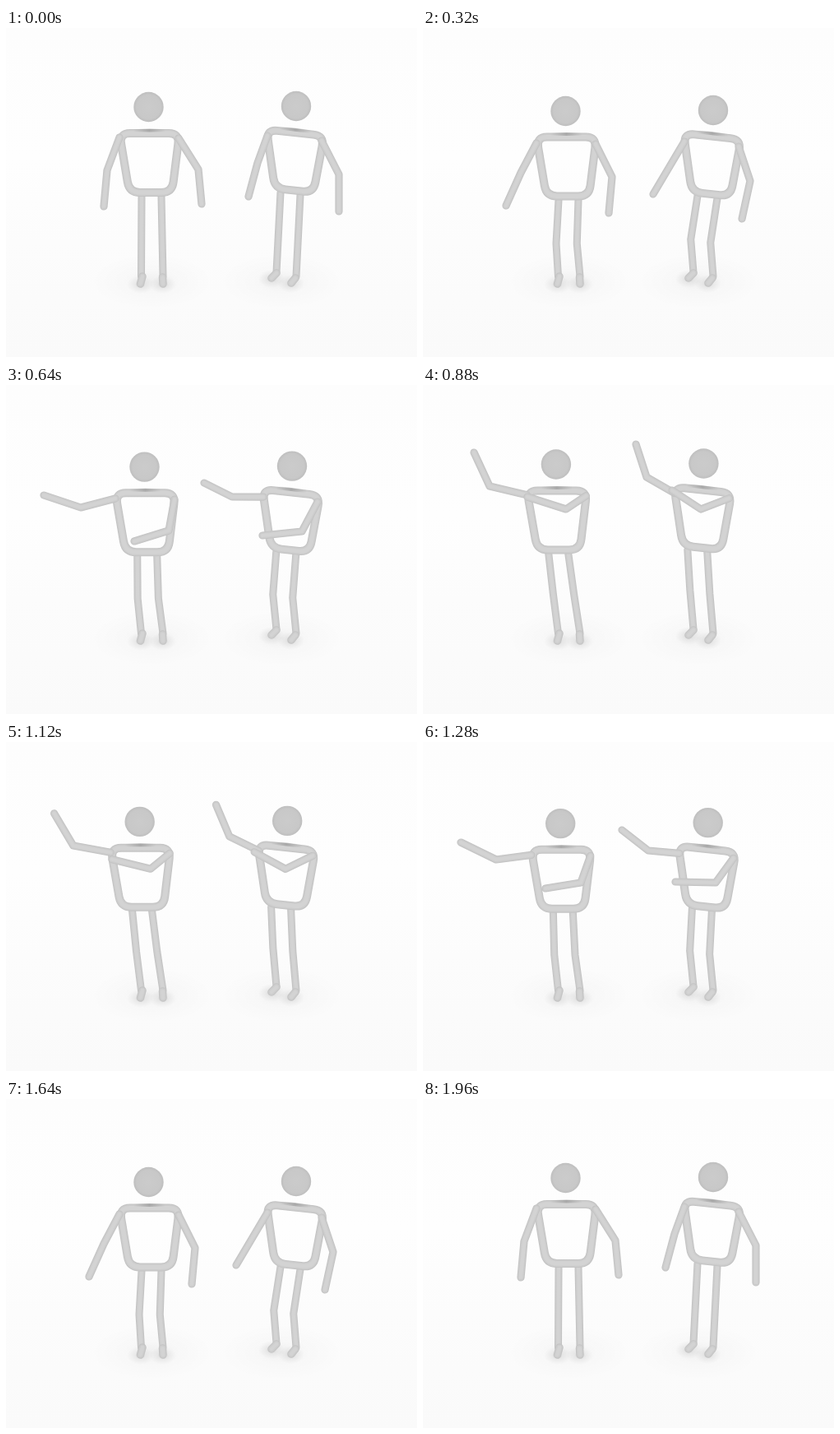
Animation, 500 px wide and 400 px high, one loop 2480 ms. Source, as an HTML page:

```html
<!DOCTYPE html>
<html lang="en">
<head>
<meta charset="utf-8">
<title>Two figures</title>
<style>
  html, body { margin: 0; width: 100%; height: 100%; overflow: hidden; background: #fdfdfd; }
  svg { display: block; width: 100%; height: 100%; }
  path { fill: none; stroke-linecap: round; stroke-linejoin: round; }
</style>
</head>
<body>
<svg id="stage" viewBox="0 0 500 400">
  <defs>
    <linearGradient id="room" x2="0" y2="1">
      <stop offset="0" stop-color="#fdfdfd"/>
      <stop offset=".4" stop-color="#fefefe"/>
      <stop offset=".65" stop-color="#fcfcfc"/>
      <stop offset="1" stop-color="#fafafa"/>
    </linearGradient>
    <radialGradient id="shade">
      <stop offset="0" stop-color="#000" stop-opacity=".16"/>
      <stop offset=".4" stop-color="#000" stop-opacity=".05"/>
      <stop offset="1" stop-color="#000" stop-opacity="0"/>
    </radialGradient>
    <radialGradient id="ball">
      <stop offset="0" stop-color="#cbcbcb"/>
      <stop offset=".8" stop-color="#c8c8c8"/>
      <stop offset="1" stop-color="#bebebe"/>
    </radialGradient>
    <linearGradient id="neck">
      <stop offset=".2" stop-color="#8c8c8c" stop-opacity="0"/>
      <stop offset=".5" stop-color="#8c8c8c" stop-opacity=".55"/>
      <stop offset=".8" stop-color="#8c8c8c" stop-opacity="0"/>
    </linearGradient>
  </defs>
  <rect width="500" height="400" fill="url(#room)"/>
</svg>
<script>
const STEP = 40, STEPS = 62, APEX = 24;
const KEYS = [0, 8, 16, 17, 22, APEX];
const SWAY = [0, 0, -5, -6.3, -11.6];
const DROP = [0, 5, 3.6, 3.1, 0.5];

// Arm poses are [elbow x, elbow y, hand x, hand y] at each key.
const FIGURES = [
  {
    head: [173.5, 96],
    torso: [[138, 128], [211, 128], [202, 200], [150, 200]],
    legs: [
      { hip: [165, 205], ankle: [164.5, 302], foot: [[166, 302], [163.5, 311]] },
      { hip: [189, 205], ankle: [191, 302], foot: [[190.5, 303], [191, 311]] }
    ],
    bend: 0.55,
    arms: [
      { shoulder: [138, 133], poses: [[123, 173, 119, 217], [119, 176, 101, 216],
        [91, 149, 46, 134], [89, 143, 46, 122], [81, 123, 62, 82]] },
      { shoulder: [210, 134], poses: [[234, 172, 238, 214], [230, 181, 226, 225],
        [198, 177, 156, 190], [192, 171, 149, 178], [174, 151, 127, 136]] }
    ]
  },
  {
    head: [353, 95],
    torso: [[317, 123.5], [387, 131], [374, 200], [327, 195]],
    legs: [
      { hip: [334, 200], ankle: [329, 297], foot: [[329, 298], [323, 304]] },
      { hip: [358, 203], ankle: [353, 302], foot: [[352, 304], [347, 310]] }
    ],
    bend: 1.15,
    arms: [
      { shoulder: [318, 131], poses: [[306, 164, 295, 205], [299, 170, 280, 202],
        [275, 136, 241, 119], [274, 132, 242, 107], [272, 112, 259, 72]] },
      { shoulder: [384, 137], poses: [[405, 178, 405, 223], [398, 186, 388, 232],
        [360, 178, 312, 183], [356, 171, 307, 170], [338, 151, 303, 128]] }
    ]
  }
];

const svg = document.getElementById('stage');

function add(name, attrs) {
  const node = document.createElementNS('http://www.w3.org/2000/svg', name);
  for (const key in attrs) node.setAttribute(key, attrs[key]);
  return svg.appendChild(node);
}

function tube(width) {
  const passes = [['#c3c3c3', width], ['#cdcdcd', width - 2], ['#d3d3d3', width - 5]]
    .map(([stroke, w]) => add('path', { stroke, 'stroke-width': w }));
  return d => passes.forEach(p => p.setAttribute('d', d));
}

// Smooth curve through the keys that never overshoots; the last key eases to rest.
function track(values) {
  const v = [...values, values[4] + 0.08 * (values[4] - values[3])];
  const secant = i => (v[i + 1] - v[i]) / (KEYS[i + 1] - KEYS[i]);
  const slope = v.map((_, i) => {
    if (i === 0 || i === v.length - 1) return 0;
    const a = secant(i - 1), b = secant(i);
    if (a * b <= 0) return 0;
    const mean = (v[i + 1] - v[i - 1]) / (KEYS[i + 1] - KEYS[i - 1]);
    return Math.sign(mean) * Math.min(Math.abs(mean), 3 * Math.abs(a), 3 * Math.abs(b));
  });
  return k => {
    let i = 0;
    while (i < KEYS.length - 2 && k >= KEYS[i + 1]) i++;
    const h = KEYS[i + 1] - KEYS[i], u = (k - KEYS[i]) / h, w = 1 - u;
    return v[i] * (1 + 2 * u) * w * w + v[i + 1] * u * u * (3 - 2 * u)
      + h * u * w * (slope[i] * w - slope[i + 1] * u);
  };
}

const swayAt = track(SWAY), dropAt = track(DROP);
const shift = ([x, y], dx, dy) => [x + dx, y + dy];
const line = points => 'M' + points.map(p => p.map(n => n.toFixed(2)).join(' ')).join('L');
const shoulderAt = (arm, sway, drop) => shift(arm.shoulder, sway, drop * 1.4);

function bone(vectors) {
  const angle = track(vectors.map(([x, y]) => Math.atan2(-x, y)));
  const length = track(vectors.map(([x, y]) => Math.hypot(x, y)));
  return k => [-Math.sin(angle(k)) * length(k), Math.cos(angle(k)) * length(k)];
}

function rounded(points, radius) {
  const toward = (a, b) => {
    const t = radius / Math.hypot(b[0] - a[0], b[1] - a[1]);
    return [a[0] + (b[0] - a[0]) * t, a[1] + (b[1] - a[1]) * t];
  };
  const n = points.length;
  return points.map((p, i) => (i ? 'L' : 'M') + toward(p, points[(i + n - 1) % n])
    + 'Q' + p + ' ' + toward(p, points[(i + 1) % n])).join('') + 'Z';
}

function build(figure) {
  const feet = figure.legs.map(leg => leg.foot[1]);
  const cx = (feet[0][0] + feet[1][0]) / 2;
  add('ellipse', { cx, cy: 308, rx: 75, ry: 34, fill: 'url(#shade)', opacity: 0.3 });
  feet.forEach(([x, y]) =>
    add('ellipse', { cx: x, cy: y + 1, rx: 16, ry: 11, fill: 'url(#shade)' }));

  const legs = figure.legs.map(() => tube(9));
  figure.legs.forEach(leg => tube(9.5)(line(leg.foot)));
  const torso = tube(10);
  const neck = add('ellipse', { rx: 32, ry: 2, fill: 'url(#neck)' });
  const arms = figure.arms.map(arm => {
    const upper = bone(arm.poses.map((p, i) => {
      const s = shoulderAt(arm, SWAY[i], DROP[i]);
      return [p[0] - s[0], p[1] - s[1]];
    }));
    const lower = bone(arm.poses.map(p => [p[2] - p[0], p[3] - p[1]]));
    return { arm, upper, lower, draw: tube(9.2) };
  });
  const head = add('circle', { r: 18.2, fill: 'url(#ball)' });

  return k => {
    const sway = swayAt(k), drop = dropAt(k);
    const [hx, hy] = shift(figure.head, sway, drop);
    head.setAttribute('cx', hx);
    head.setAttribute('cy', hy);

    const corners = figure.torso.map((p, i) => shift(p, sway * (i < 2 ? 1 : 0.95), drop * 0.9));
    torso(rounded(corners, 13));
    const [a, b] = corners;
    const tilt = Math.atan2(b[1] - a[1], b[0] - a[0]) * 180 / Math.PI;
    neck.setAttribute('transform',
      `translate(${(a[0] + b[0]) / 2} ${(a[1] + b[1]) / 2 - 3.5}) rotate(${tilt})`);

    figure.legs.forEach(({ hip, ankle }, i) => {
      const top = shift(hip, sway * 1.05, drop * 0.8);
      const knee = [(top[0] + ankle[0]) / 2 - drop * figure.bend,
                    (top[1] + ankle[1]) / 2 + drop * 1.3];
      legs[i](line([top, knee, ankle]));
    });

    arms.forEach(({ arm, upper, lower, draw }) => {
      const shoulder = shoulderAt(arm, sway, drop);
      const elbow = shift(shoulder, ...upper(k));
      draw(line([shoulder, elbow, shift(elbow, ...lower(k))]));
    });
  };
}

const poseFigures = FIGURES.map(build);

function render(ms) {
  const step = Math.floor(ms / STEP) % STEPS;
  const k = step <= APEX ? step : Math.max(0, 2 * APEX + 1 - step);
  poseFigures.forEach(pose => pose(k));
}

const start = performance.now();
function tick() {
  render(performance.now() - start);
  requestAnimationFrame(tick);
}
tick();
</script>
</body>
</html>
```
